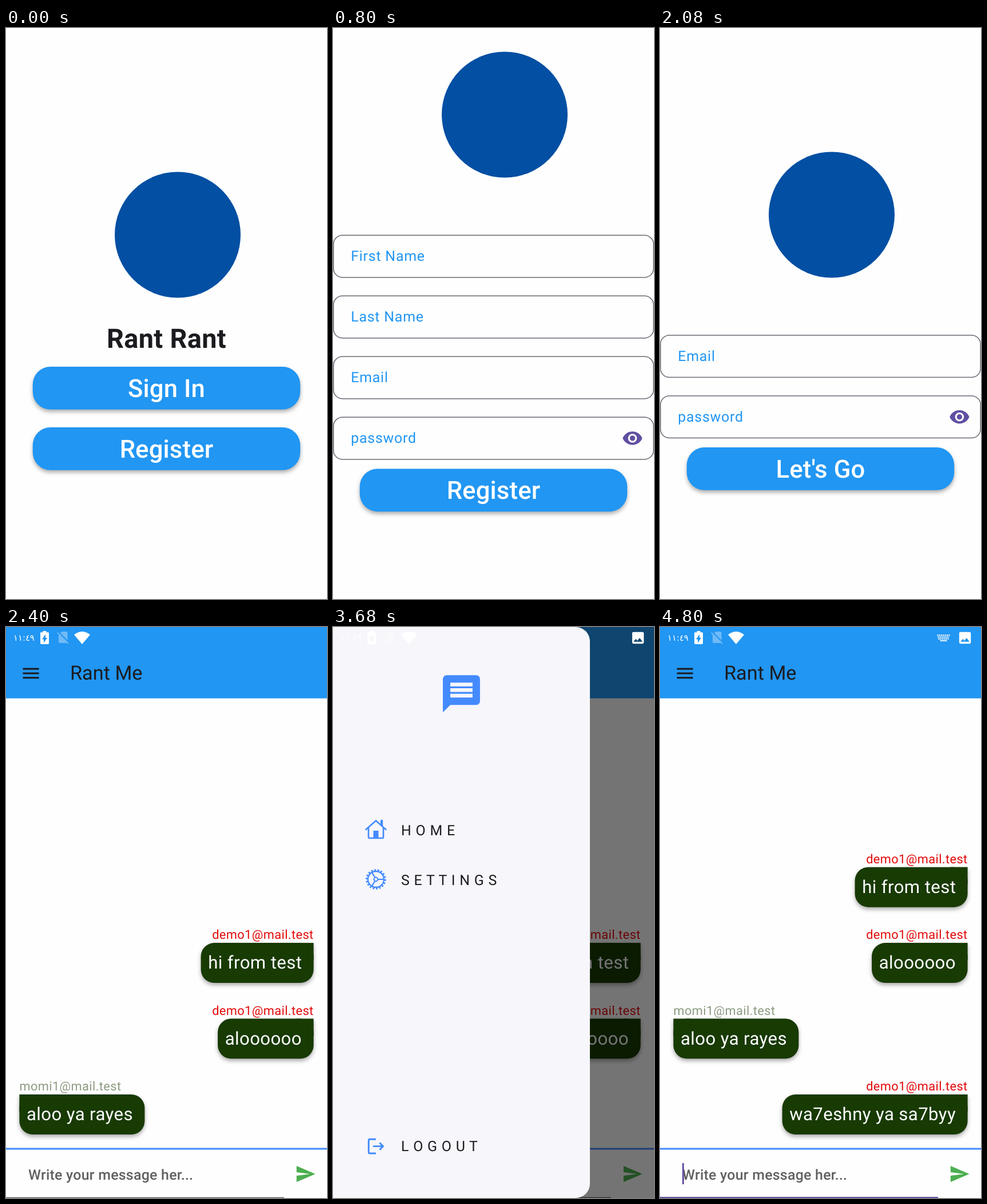
Recreate the animation shown at these times as an HTML page. Size 561 by 998 pixels, loop 5.6 s.

```html
<!DOCTYPE html>
<html lang="en">
<head>
<meta charset="utf-8">
<style>
  html, body { margin: 0; width: 100%; height: 100%; overflow: hidden; background: #fefefe; }
  svg { display: block; font-family: Roboto, sans-serif; text-rendering: geometricPrecision; }
  .shadow { filter: drop-shadow(0 4px 3.5px rgba(0, 0, 0, .32)); }
</style>
</head>
<body>
<svg id="stage" width="561" height="998" viewBox="0 0 561 998"></svg>
<script>
const BLUE = '#2196f3', ACCENT = '#448aff', INK = '#1c1b1f', PURPLE = '#6750a4';
const DP = 561 / 360;
const HOLD = 800;

const ICONS = {
  eye: 'M12 4.5C7 4.5 2.73 7.61 1 12c1.73 4.39 6 7.5 11 7.5s9.27-3.11 11-7.5c-1.73-4.39-6-7.5-11-7.5zM12 17a5 5 0 1 1 0-10 5 5 0 0 1 0 10zm0-8a3 3 0 1 0 0 6 3 3 0 0 0 0-6z',
  send: 'M2 21L23 12 2 3V10l15 2-15 2z',
  message: 'M20 2H4a2 2 0 0 0-2 2V22l4-4h14a2 2 0 0 0 2-2V4a2 2 0 0 0-2-2zm-2 12H6v-2h12zm0-3H6V9h12zm0-3H6V6h12z',
  battery: 'M15.7 4H14V2h-4v2H8.3Q7 4 7 5.3v15.4Q7 22 8.3 22h7.4q1.3 0 1.3-1.3V5.3Q17 4 15.7 4zM11 20v-5.5H9L13 7v5.5h2z',
  noSim: 'M19 5a2 2 0 0 0-2-2h-7L7.7 5.3 19 16.7zM3.65 3.9L2.4 5.15 5 7.8V19a2 2 0 0 0 2 2h10l1-.3 1.9 1.9 1.2-1.25z',
  image: 'M21 19V5a2 2 0 0 0-2-2H5a2 2 0 0 0-2 2v14a2 2 0 0 0 2 2h14a2 2 0 0 0 2-2zM8.5 13.5l2.5 3L14.5 12l4.5 6H5z'
};

const rect = (x, y, w, h, fill, extra = '') =>
  `<rect x="${x}" y="${y}" width="${w}" height="${h}" fill="${fill}" ${extra}/>`;
const text = (str, x, y, size, fill, spacing = 0, extra = '') =>
  `<text x="${x}" y="${y}" font-size="${size * DP}" fill="${fill}" letter-spacing="${spacing * DP}" ${extra}>${str}</text>`;
const icon = (name, x, y, fill, sx = DP, sy = sx, extra = '') =>
  `<path d="${ICONS[name]}" transform="translate(${x} ${y}) scale(${sx} ${sy})" fill="${fill}" fill-rule="evenodd" ${extra}/>`;
const line = (d, width, extra = '') =>
  `<path d="${d}" fill="none" stroke="${ACCENT}" stroke-width="${width}" ${extra}/>`;

// Welcome and form screens
const badge = cy => `<circle cx="300" cy="${cy}" r="110" fill="#024fa3"/>`;
const button = (label, y) =>
  rect(46.75, y, 467.5, 74.8, BLUE, 'rx="31" class="shadow"') +
  text(label, 280.5, y + 53, 28, '#fff', .1, 'text-anchor="middle" font-weight="500"');
const field = (label, y) =>
  rect(.8, y, 559.4, 73.6, 'none', 'rx="15.6" stroke="#6c6974" stroke-width="1.5"') +
  text(label, 31.2, y + 45, 16, BLUE, .5);
const password = y => field('password', y) + icon('eye', 504.7, y + 18, '#614fa1');

// Chat screen
const keyboard = cx =>
  `<g stroke="#fff" stroke-width="2.2" fill="none">
    <path d="M${cx - 11} 14.3h22m-21 3.3h20m-19 3.3h18" stroke-dasharray="2.2 1.1"/>
    <path d="M${cx - 6} 24h12" stroke-width="1.8"/></g>`;
const image = cx => icon('image', cx - 13.5, 5.4, '#fff', 1.13);
const status = extras =>
  text('١١:٤٩', 13, 24, 9.5, '#fff', 0, 'font-family="DejaVu Sans, sans-serif"') +
  icon('battery', 49.5, 4.7, '#fff', 1.5, 1.15) +
  icon('noSim', 86.3, 4.6, '#fff', 1.12, 1.12, 'opacity=".35"') +
  '<path d="M119 13.5Q133 2.5 147 13.5L133 30z" fill="#fff"/>' + extras;

const messages = [
  { body: 'hi from test', width: 197 },
  { body: 'aloooooo', width: 167.5 },
  { body: 'aloo ya rayes', width: 219, other: true },
  { body: 'wa7eshny ya sa7byy', width: 324 }
];
function bubble({ body, width, other }, y) {
  const x = other ? 23.4 : 537.6 - width;
  const corner = other ? x : x + width - 30;
  const sender = other
    ? text('momi1@mail.test', 23.4, y - 7, 14, '#8c9c82', .25)
    : text('demo1@mail.test', 537.6, y - 7, 14, '#e30b0b', .25, 'text-anchor="end"');
  return sender + '<g class="shadow">' + rect(x, y, width, 70, '#183a03', 'rx="23.4"') +
    rect(corner, y, 30, 30, '#183a03') + '</g>' +
    text(body, x + 12.6, y + 45, 20, '#fff', .25);
}
function chat(count, input, focused) {
  const shown = messages.slice(0, count);
  return rect(0, 0, 561, 124.7, BLUE) +
    [71.6, 79.4, 87.2].map(y => rect(29.6, y, 28, 3.1, INK)).join('') +
    text('Rant Me', 112, 92, 22, INK) +
    shown.map((m, i) => bubble(m, 817 - (count - 1 - i) * 132.45)).join('') +
    rect(0, 910.5, 561, 3, ACCENT) + input +
    (focused ? rect(0, 996, 486, 2, PURPLE) : rect(0, 996.6, 486, 1.4, '#6a6870')) +
    icon('send', 504.7, 937.3, '#4caf50');
}
const hint = text('Write your message her...', 39, 966, 16, '#606060', .15, 'font-weight="500"');
const typed = text(messages[3].body, 39, 966.5, 16, INK, .5);
const cursor = rect(38.9, 937, 3, 37, PURPLE);

// Side drawer
const home =
  line('M57.5 354L75 338.5 92.5 354M62 351V367q0 2 2 2H86q2 0 2-2V351', 2.6, 'stroke-linecap="round" stroke-linejoin="round"') +
  rect(83, 337, 4.2, 11, ACCENT, 'rx="1"') + rect(70.5, 356, 9, 13, ACCENT);
const spokes = [0, 120, 240].map(a =>
  line('M78.5 441H89', 2.2, `transform="rotate(${a} 75 441)"`)).join('');
const gear = `<g fill="none" stroke="${ACCENT}">
  <circle cx="75" cy="441" r="14" stroke-width="2.3"/>
  <circle cx="75" cy="441" r="16.4" stroke-width="2.8" pathLength="36" stroke-dasharray="1"/>
  <circle cx="75" cy="441" r="3.4" stroke-width="2"/></g>` + spokes;
const exit = line('M75 895.3H64.5Q62.3 895.3 62.3 897.5V917.8Q62.3 920 64.5 920H75M70 907.6H87M81.5 901.5L87.5 907.6 81.5 913.7', 2.9);
const entry = (label, y) => text(label, 119, y, 16, INK, .5);
const drawer =
  rect(0, 0, 561, 998, '#000', 'opacity=".54"') +
  '<path d="M0 0H424a25 25 0 0 1 25 25V973a25 25 0 0 1-25 25H0z" fill="#f6f6fb"/>' +
  icon('message', 185.5, 77.8, ACCENT, 3.246) + home + gear + exit +
  entry('H O M E', 363.5) + entry('S E T T I N G S', 451) + entry('L O G O U T', 915.5);

const scenes = [
  badge(361.5) +
    text('Rant Rant', 280.5, 559.4, 30, INK, .25, 'text-anchor="middle" font-weight="600"') +
    button('Sign In', 592) + button('Register', 698),
  badge(151.5) + field('First Name', 362.3) + field('Last Name', 468.3) +
    field('Email', 574.3) + password(680.3) + button('Register', 770.4),
  badge(326.5) + field('Email', 537) + password(643) + button("Let's Go", 733),
  chat(3, hint) + status(''),
  chat(3, hint) + drawer + status(image(533)),
  chat(3, typed, true) + status(image(495.5) + keyboard(533)),
  chat(4, hint + cursor, true) + status(keyboard(495.5) + image(533))
];

const stage = document.getElementById('stage');
let current = -1;
function tick() {
  const index = Math.floor(performance.now() / HOLD) % scenes.length;
  if (index !== current) stage.innerHTML = scenes[current = index];
  requestAnimationFrame(tick);
}
tick();
</script>
</body>
</html>
```
